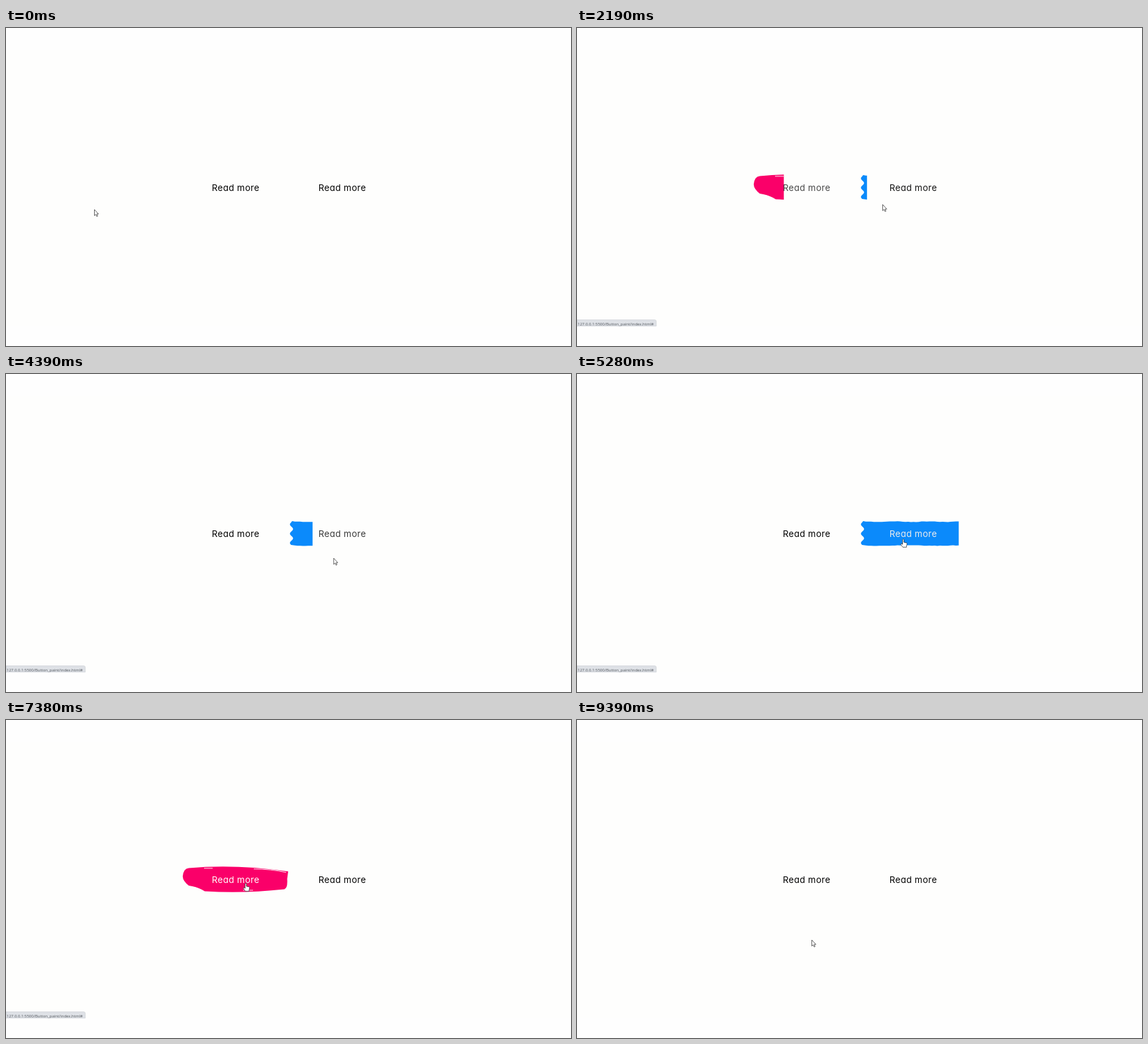
Write an HTML page that moves like this. It is 853 by 480 pixels and loops after 9780 ms.

```html
<!DOCTYPE html>
<html lang="en">
<head>
<meta charset="utf-8">
<title>Paint buttons</title>
<style>
  html, body { margin: 0; width: 100%; height: 100%; overflow: hidden; background: #fefefe; }
  svg { display: block; width: 853px; height: 480px; }
  .label {
    font: 400 13.3px Inter, "Noto Sans", sans-serif;
    font-feature-settings: "cv11";
    letter-spacing: .38px;
    text-anchor: middle;
  }
  .url { font: 6px "Open Sans", "Noto Sans", sans-serif; fill: #555a60; }
</style>
</head>
<body>
<svg viewBox="0 0 853 480">
  <defs>
    <clipPath id="pinkClip"><rect x="266" y="215" width="0" height="50"/></clipPath>
    <clipPath id="blueClip"><rect x="427" y="215" width="0" height="50"/></clipPath>
  </defs>
  <rect y="33" width="853" height="417" fill="#fefefd"/>

  <g clip-path="url(#pinkClip)">
    <path fill="#fa0069" d="M266.8 236 Q268 224 276 223.5 Q345 217 426 228.5 L424.5 240
      Q425.5 254 420 255.5 Q360 262 300 258.5 Q290 252 276 250 Q267 243 266.8 236 Z"/>
    <path fill="none" stroke="#fefefe" stroke-width=".9" d="M299 223.8 H312 M374 224.8 Q400 225 423 230 M358 257 H373"/>
  </g>
  <path id="bluePaint" clip-path="url(#blueClip)" fill="#0b8afb"/>

  <text class="label" id="pinkText" x="346.7" y="245.7">Read more</text>
  <text class="label" id="blueText" x="507.7" y="245.7">Read more</text>

  <g id="status">
    <path d="M0 440.5 H117.5 Q119.7 440.5 119.7 443 V450 H0 Z" fill="#dee1e6" stroke="#c8cbd0" stroke-width=".6"/>
    <text class="url" x="1" y="448.8">127.0.0.1:5500/Button_paint/index.html#</text>
  </g>

  <g id="cursor" fill="#fff" stroke="#222" stroke-width=".7" stroke-linejoin="round">
    <path id="arrow" d="M0 0 V9.2 L2.1 7.4 L3.5 10.5 L4.9 9.9 L3.6 6.8 H6.2 Z"/>
    <path id="hand" d="M-1 1 Q0 -.6 1 1 V5 L4.8 5.8 Q5.8 6 5.8 7.5 L5 10.6 V12.4 H-.6 L-3.6 8.4 Q-4 6.8 -2.4 7.1 L-1 8.2 Z"/>
  </g>
</svg>

<script>
const LOOP = 9780, FADE = 500, LINGER = 400;
const BUTTON = { width: 161, top: 221, bottom: 260 };
const left = { pink: 266, blue: 427 };
const $ = id => document.getElementById(id);

// Where the pointer turns or rests: time, x, y of its tip
const stops = [
  [200, 133.5, 274], [900, 346, 245], [1680, 346, 245], [2095, 458.5, 260], [2190, 461.5, 266.5],
  [2380, 488, 272], [2640, 490, 240], [4010, 490, 240], [4300, 495, 281], [5280, 492.5, 249],
  [5990, 492.5, 249], [6620, 398.5, 293], [6950, 364, 250], [7380, 362, 246],
  [7650, 490, 248], [8690, 490, 248], [9390, 354.5, 332]
];

function pointerAt(time) {
  const i = stops.findIndex(stop => stop[0] > time);
  const b = stops.at(i), a = stops[i - 1] ?? b;
  const k = a === b || i < 0 ? 1 : (time - a[0]) / (b[0] - a[0]);
  return [a[1] + (b[1] - a[1]) * k, a[2] + (b[2] - a[2]) * k];
}

function hovered(time) {
  const [x, y] = pointerAt(time);
  if (y < BUTTON.top || y >= BUTTON.bottom) return null;
  return Object.keys(left).find(name => x >= left[name] && x < left[name] + BUTTON.width) ?? null;
}

// Moments at which the pointer enters or leaves a button
const changes = [];
for (let t = 1; t < LOOP; t++) {
  const before = hovered(t - 1), after = hovered(t);
  if (before !== after) changes.push({ t, before, after });
}

// The CSS "ease" curve, cubic-bezier(.25, .1, .25, 1)
function ease(x) {
  if (x <= 0) return 0;
  if (x >= 1) return 1;
  const curve = (a, b, s) => 3 * a * s * (1 - s) ** 2 + 3 * b * s * s * (1 - s) + s ** 3;
  let low = 0, high = 1;
  for (let i = 0; i < 24; i++) {
    const mid = (low + high) / 2;
    if (curve(.25, .25, mid) < x) low = mid; else high = mid;
  }
  return curve(.1, 1, low);
}

// A transition cut short returns in proportionally less time.
function hoverAmount(name, time) {
  let from = 0, to = 0, start = 0, span = FADE;
  const at = t => from + (to - from) * ease((t - start) / span);
  for (const { t, before, after } of changes) {
    if (t > time) break;
    if (before !== name && after !== name) continue;
    from = at(t);
    to = after === name ? 1 : 0;
    span = FADE * Math.abs(to - from) || 1;
    start = t;
  }
  return at(time);
}

// Torn strip: ragged long sides, scalloped ends
function tornStrip() {
  let seed = 7;
  const jitter = size => ((seed = seed * 16807 % 2147483647) / 2147483647 - .5) * size;
  const wave = (value, peak, period) => Math.cos((value - peak) / period * 2 * Math.PI);
  const points = [];
  for (let x = 432; x < 584; x += 4) points.push([x, 222.8 + wave(x, 505, 52) * .5 + jitter(.7)]);
  for (let y = 223; y < 259; y += 2) points.push([585.8 + wave(y, 239, 13), y]);
  for (let x = 584; x > 432; x -= 4) points.push([x, 258.9 + wave(x, 545, 90) * .4 + jitter(.6)]);
  for (let y = 258; y > 223; y -= 2) points.push([431 - wave(y, 227, 14) * 2.5, y]);
  return "M" + points.map(p => p.join(" ")).join("L") + "Z";
}
$("bluePaint").setAttribute("d", tornStrip());

function paintButton(name, time) {
  const amount = hoverAmount(name, time);
  const shade = Math.round(255 * amount);
  $(name + "Clip").firstElementChild.setAttribute("width", BUTTON.width * amount);
  $(name + "Text").setAttribute("fill", `rgb(${shade},${shade},${shade})`);
}

function show(id, on) {
  $(id).setAttribute("visibility", on ? "visible" : "hidden");
}

function draw(now) {
  const time = now % LOOP;
  Object.keys(left).forEach(name => paintButton(name, time));

  const [x, y] = pointerAt(time);
  const over = hovered(time) !== null;
  $("cursor").setAttribute("transform", `translate(${x} ${y})`);
  show("hand", over);
  show("arrow", !over);

  // The address stays a moment after the pointer has left.
  const lastLeft = changes.findLast(c => c.t <= time && c.after === null);
  show("status", over || (lastLeft && time - lastLeft.t < LINGER));
}

let origin;
function frame(now) {
  origin ??= now;
  draw(now - origin);
  requestAnimationFrame(frame);
}
draw(0);
requestAnimationFrame(frame);
</script>
</body>
</html>
```
